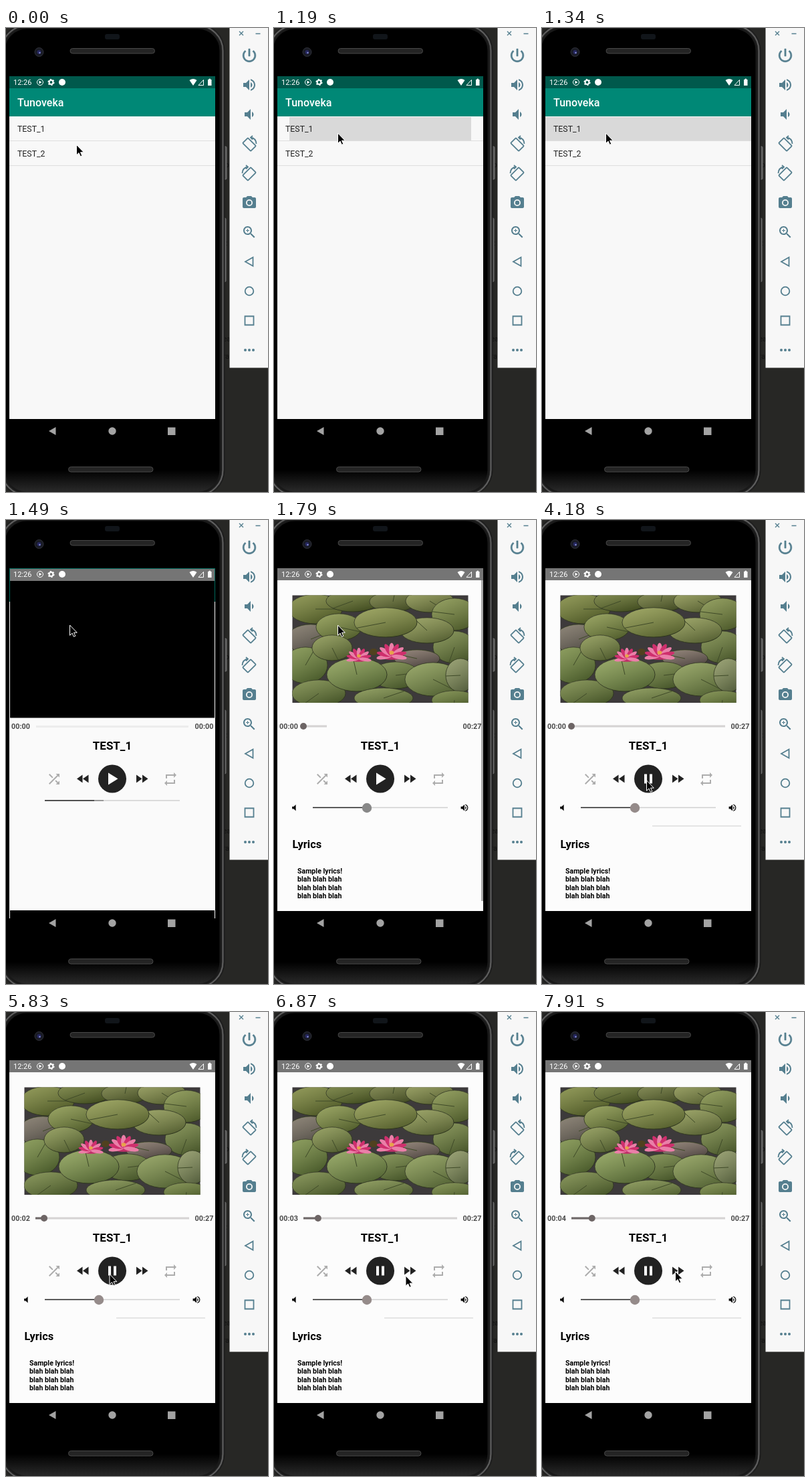
Animation, 392 px wide and 693 px high, one loop 8000 ms. Source, as an HTML page:

```html
<!DOCTYPE html>
<html lang="en">
<head>
<meta charset="utf-8">
<title>Music player demo</title>
<style>
html, body { margin: 0; width: 100%; height: 100%; overflow: hidden; background: #272725; }
svg { display: block; width: 392px; height: 693px; font-family: Roboto, sans-serif; }
.panel { fill: #557f8f; }
.outline { fill: none; stroke: #557f8f; stroke-width: 1.8; }
.bold { font-weight: 700; }
.time { font-size: 10.8px; font-weight: 700; fill: #4a4a4a; }
</style>
</head>
<body>
<svg viewBox="0 0 392 693">
  <defs>
    <linearGradient id="glass" y1="660" y2="693" x2="0" gradientUnits="userSpaceOnUse">
      <stop/><stop offset="1" stop-color="#2a2a2a"/>
    </linearGradient>
    <linearGradient id="shade" x2=".6" y2="1">
      <stop stop-color="#e4e6b0" stop-opacity=".3"/><stop offset="1" stop-color="#1c2410" stop-opacity=".4"/>
    </linearGradient>
    <clipPath id="frame"><path d="M27.5 112.5h263V273h-263z"/></clipPath>
    <path id="speaker" d="M3 9v6h4l5 5V4L7 9H3zm13.5 3c0-1.77-1.02-3.29-2.5-4.03v8.05c1.48-.73 2.5-2.25 2.5-4.02zM14 3.23v2.06c2.89.86 5 3.54 5 6.71s-2.11 5.85-5 6.71v2.06c4.01-.91 7-4.49 7-8.77s-2.99-7.86-7-8.77z"/>
  </defs>

  <!-- Phone -->
  <g font-size="10" fill="#111"><text x="325" y="468">ea</text><text x="325" y="494">ra</text><text x="328" y="208">o</text><text x="329" y="325">:</text></g>
  <g fill="#5c5c5c" stroke="#858585" stroke-width=".8">
    <rect x="325" y="177" width="5" height="49" rx="1.5"/>
    <rect x="324" y="284" width="5" height="95" rx="1.5"/>
  </g>
  <rect x="-9" y="-6" width="336" height="706" rx="40" fill="#2b2b2b" stroke="#181818"/>
  <rect x="-6.500" y="-3.5" width="331" height="701" rx="37.5" fill="none" stroke="#666" stroke-width="1.6"/>
  <rect x="-3" y="0" width="324" height="694" rx="34" fill="url(#glass)" stroke="#191919" stroke-width="3"/>
  <rect x="148" y="9" width="22" height="8" rx="3" fill="#11151a"/>
  <g fill="#242424" stroke="#484848">
    <rect x="96" y="30.5" width="126.5" height="7.5" rx="3.7"/>
    <rect x="93.5" y="655.5" width="126.5" height="7.5" rx="3.7"/>
  </g>
  <circle cx="49.5" cy="36" r="6.5" fill="#191b24" stroke="#30323a"/>
  <circle cx="49.5" cy="36" r="3" fill="#25275e"/>
  <circle cx="50.5" cy="37" r="1.2" fill="#8c92d8"/>

  <!-- Track list -->
  <g id="list">
    <path d="M5 72h308v512H5z" fill="#f8f8f8"/>
    <path d="M5 72h308v18H5z" fill="#00594c"/>
    <path d="M5 90h308v42H5z" fill="#008876"/>
    <rect id="ripple" y="133" height="35" fill="#d9d9d9"/>
    <path d="M5 168.5h308M5 205.5h308" stroke="#dedede"/>
    <text x="17" y="117" font-size="16" font-weight="500" fill="#fff">Tunoveka</text>
    <g font-size="12.3" fill="#222"><text x="17" y="154.5">TEST_1</text><text x="17" y="191.5">TEST_2</text></g>
  </g>

  <!-- Player while it opens -->
  <g id="opening">
    <path d="M5 72h308v50H5z" fill="#00695c"/>
    <path d="M5 122h308v473H5z" fill="#fafafa"/>
    <path d="M6 73h306v18H6z" fill="#757575"/>
    <path d="M6 91h306v204.5H6zM6 583h306v12H6z"/>
    <path d="M45 308.5h228" stroke="#ececec" stroke-width="3"/>
    <path d="M58 419h202" stroke="#d0d0d0" stroke-width="1.5"/>
    <path d="M132 419h14" stroke="#999" stroke-width="2"/>
    <path d="M58 419h74" stroke="#222" stroke-width="1.7"/>
  </g>

  <!-- Player -->
  <g id="player">
    <path d="M5 72h308v512H5z" fill="#fcfcfc"/>
    <path d="M5 72h308v18H5z" fill="#757575"/>
    <g id="photo" clip-path="url(#frame)"><path d="M27 112h264v161H27z" fill="#3d3a3b"/></g>
    <path id="track" stroke="#d5d3d3" stroke-width="3"/>
    <path id="played" stroke="#6d6767" stroke-width="3"/>
    <circle id="thumb" cy="308" r="5" fill="#6d6565"/>
    <path d="M139 429.5h121" stroke="#d0d0d0" stroke-width="1.5"/>
    <path d="M58 429.5h81" stroke="#222" stroke-width="1.7"/>
    <circle id="knob" cx="139" cy="430" r="7.2"/>
    <path transform="translate(23 422.6)scale(.6)" d="M7 9v6h4l5 5V4l-5 5H7z"/>
    <use href="#speaker" transform="translate(277.8 422.6)scale(.6)"/>
    <path id="divider" d="M165 457h133" stroke="#dedede" stroke-width="1.5"/>
    <text class="bold" x="27.5" y="490" font-size="16.5">Lyrics</text>
    <g id="lyrics" class="bold" font-size="10.6"></g>
    <path id="scrollbar" d="M311.5 90v479" stroke="#a9a9a9" stroke-width="3"/>
  </g>

  <!-- Controls -->
  <g id="deck">
    <text id="elapsed" class="time" x="8" y="312"></text>
    <text id="total" class="time" x="282.5" y="312"></text>
    <text class="bold" x="159" y="343" font-size="17" text-anchor="middle">TEST_1</text>
    <g fill="#adadad">
      <path transform="translate(60 375)" d="M10.59 9.17L5.41 4 4 5.41l5.17 5.17 1.42-1.41zM14.5 4l2.04 2.04L4 18.59 5.41 20 17.96 7.46 20 9.5V4h-5.5zm.33 9.41l-1.41 1.41 3.13 3.13L14.5 20H20v-5.5l-2.04 2.04-3.13-3.13z"/>
      <path transform="translate(234 375)" d="M7 7h10v3l4-4-4-4v3H5v6h2V7zm10 10H7v-3l-4 4 4 4v-3h12v-6h-2v4z"/>
    </g>
    <g fill="#222">
      <path transform="translate(103.5 374.5)" d="M11 18V6l-8.5 6 8.5 6zm.5-6l8.5 6V6l-8.5 6z"/>
      <path transform="translate(191 374.5)" d="M4 18l8.5-6L4 6v12zm9-12v12l8.5-6L13 6z"/>
      <circle cx="159" cy="386.5" r="21"/>
    </g>
    <path id="toggle" fill="#fff"/>
  </g>

  <!-- Status bar and navigation -->
  <g fill="#fff">
    <text x="11" y="85" font-size="11">12:26</text>
    <circle cx="51" cy="81" r="4.5" fill="none" stroke="#fff"/>
    <path d="M49.5 78.5v5l4-2.5z"/>
    <circle cx="67.5" cy="81" r="2.9" fill="none" stroke="#fff" stroke-width="2"/>
    <circle cx="67.5" cy="81" r="4.3" fill="none" stroke="#fff" stroke-width="1.6" stroke-dasharray="2.2 2.3"/>
    <circle cx="84" cy="81" r="5"/>
    <path d="M274.5 78q5.5-4 11 0l-5.5 8z"/>
    <path d="M288 85.5h7.5v-8z" fill="none" stroke="#fff"/>
    <path d="M302 77h1.5v-1.2h2.5V77h1.5v9H302z"/>
  </g>
  <g fill="#a3a3a3"><path d="M64 602l10.5-6v12z"/><circle cx="159" cy="602" r="5.7"/><path d="M242 596.5h11.5V608H242z"/></g>

  <!-- Emulator toolbar -->
  <path d="M334.5 0H392v507.5h-57.5z" fill="#f7f7f7"/>
  <path class="outline" style="stroke-width:1.4" d="M349 5l6 6m0-6l-6 6M373.5 8.5h7"/>
  <g class="panel">
    <path transform="translate(350.8 27.8)scale(1.1)" stroke="#557f8f" stroke-width=".5" d="M13 3h-2v10h2V3zm4.83 2.17l-1.42 1.42C17.99 7.86 19 9.81 19 12c0 3.87-3.13 7-7 7s-7-3.13-7-7c0-2.19 1.01-4.14 2.58-5.42L6.17 5.17C4.23 6.82 3 9.26 3 12c0 4.97 4.03 9 9 9s9-4.03 9-9c0-2.74-1.23-5.18-3.17-6.83z"/>
    <use href="#speaker" x="352" y="73"/>
    <path transform="translate(352 117)" d="M18.5 12c0-1.77-1.02-3.29-2.5-4.03v8.05c1.48-.73 2.5-2.25 2.5-4.02zM5 9v6h4l5 5V4L9 9H5z"/>
    <path transform="translate(352 249)" fill-rule="evenodd" d="M9 2L7.17 4H4c-1.1 0-2 .9-2 2v12c0 1.1.9 2 2 2h16c1.1 0 2-.9 2-2V6c0-1.1-.9-2-2-2h-3.17L15 2H9zm3 15a5 5 0 1 1 0-10 5 5 0 0 1 0 10zm0-1.8a3.2 3.2 0 1 0 0-6.4 3.2 3.2 0 0 0 0 6.4z"/>
    <path transform="translate(352 293)" d="M15.5 14h-.79l-.28-.27C15.41 12.59 16 11.11 16 9.5 16 5.91 13.09 3 9.5 3S3 5.91 3 9.5 5.91 16 9.5 16c1.61 0 3.09-.59 4.23-1.57l.27.28v.79l5 4.99L20.49 19l-4.99-5zm-6 0C7.01 14 5 11.99 5 9.5S7.01 5 9.5 5 14 7.01 14 9.5 11.99 14 9.5 14zm2.5-4h-2v2H9v-2H7V9h2V7h1v2h2v1z"/>
    <circle cx="358" cy="481" r="2"/><circle cx="364" cy="481" r="2"/><circle cx="370" cy="481" r="2"/>
  </g>
  <g class="outline">
    <g id="rotate"><rect x="-8.5" y="-5.5" width="17" height="11" rx="1" transform="translate(364 174)rotate(45)"/><path d="M366 163.5q8 1 8.5 9.5M369 161l-3 2.5 3 3"/></g>
    <use href="#rotate" transform="translate(728 44)scale(-1 1)"/>
    <path d="M358 349l11.5-6.5v13z"/><circle cx="364" cy="393" r="6.3"/><path d="M357.5 430.5h13v13h-13z"/>
  </g>

  <path id="cursor" d="M0 0V15.3L3.5 12 5.9 17.3 8.3 16.2 6 11.2H10.8Z" stroke="#fff"/>
</svg>

<script>
const LOOP = 8000;
const REFRESH = [0, 300, 450, 600, 740, 1190, 1340, 1490, 1640, 1790, 2090, 2240, 2390, 2540,
  2690, 2840, 2990, 3140, 3290, 4180, 4330, 4630, 4780, 4930, 5080, 5380, 5530, 5830, 5970,
  6120, 6270, 6420, 6570, 6720, 6870, 7020, 7170, 7310, 7610, 7760, 7910];
// Cursor keys: time, x, y.
const CURSOR = [[0, 105.5, 174.5], [150, 105.5, 174.5], [740, 95.5, 157], [1940, 95.5, 157], [3290, 156.5, 389],
  [4180, 156.5, 389], [4780, 155, 391.5], [5830, 155, 391.5], [6870, 197, 394], [7310, 199.5, 387.5], [LOOP, 199.5, 387.5]];
const PLAY = 'M153 377.5v18l14.5-9z';
const PAUSE = 'M153 379.5h4v14h-4zM161 379.5h4v14h-4z';

const $ = id => document.getElementById(id);
const set = (id, attrs) => { for (const k in attrs) $(id).setAttribute(k, attrs[k]); };
const show = (id, on) => set(id, { visibility: on ? 'visible' : 'hidden' });

function drawPhoto() {
  // Lily pads: centre, radii, colour.
  const pads = [
    [62, 133, 40, 22, '#727d38'], [118, 121, 40, 16, '#616e30'], [178, 122, 35, 15, '#626b36'],
    [233, 121, 36, 17, '#848d4e'], [270, 141, 34, 24, '#748442'], [55, 178, 36, 22, '#6d6064'],
    [270, 190, 32, 24, '#67793e'], [229, 165, 40, 19, '#848f50'], [97, 160, 34, 20, '#7c8b45'],
    [167, 153, 47, 22, '#848f48'], [47, 217, 33, 27, '#6e8542'], [87, 191, 30, 19, '#7a8849'],
    [214, 207, 34, 13, '#745f66'], [182, 232, 36, 20, '#667a3e'], [67, 259, 40, 20, '#64773b'],
    [124, 231, 45, 25, '#7d9550'], [238, 238, 42, 25, '#7c9050'], [279, 232, 22, 25, '#7f8a60'],
    [164, 266, 44, 15, '#708345'], [270, 269, 34, 14, '#627637']];
  const pad = ([x, y, rx, ry, fill], i) => {
    const shape = `<ellipse cx="${x}" cy="${y}" rx="${rx}" ry="${ry}"`;
    return `${shape} fill="${fill}" stroke="#2f361f"/>${shape} fill="url(#shade)"/>` +
      `<path d="M${x} ${y}l${rx * Math.cos(i * 2.4)} ${ry * Math.sin(i * 2.4)}" stroke="#3f4a28"/>`;
  };
  const flower = (x, y, size) => {
    let petals = '';
    for (let a = -100; a <= 100; a += 25)
      petals += `<ellipse cy="-10" rx="3.4" ry="10" transform="rotate(${a})" fill="${a % 50 ? '#cf2f6d' : '#ea7fa8'}"/>`;
    return `<g transform="translate(${x} ${y})scale(${size} ${size * .85})">` +
      `<ellipse rx="15" ry="6" fill="#c12f69"/>${petals}<circle cy="-5" r="3" fill="#e7a34a"/></g>`;
  };
  $('photo').innerHTML += pads.map(pad).join('') +
    '<ellipse cx="149" cy="197" rx="6" ry="5" fill="#50411f"/>' +
    flower(127, 207, .95) + flower(176, 203, 1.15);
}

function cursorAt(t) {
  const i = CURSOR.findIndex(key => key[0] > t);
  const [t0, x0, y0] = CURSOR[i - 1], [t1, x1, y1] = CURSOR[i];
  const p = (t - t0) / (t1 - t0);
  return [x0 + (x1 - x0) * p, y0 + (y1 - y0) * p];
}

function render(time) {
  const t = REFRESH.findLast(step => step <= time);
  show('list', t < 1490);
  show('opening', t === 1490);
  show('player', t >= 1640);
  show('deck', t >= 1490);

  const [left, width] = t === 1190 ? [23, 272] : t === 1340 ? [5, 308] : [5, 0];
  set('ripple', { x: left, width });

  const seconds = Math.max(0, t - 4300) / 1000;
  const x = 44 + seconds * 230 / 27;
  $('elapsed').textContent = '00:0' + Math.round(seconds);
  $('total').textContent = t < 1640 ? '00:00' : '00:27';
  set('track', { d: `M44 308H${t < 2090 ? 79 : 274}` });
  set('played', { d: `M44 308H${x}` });
  set('thumb', { cx: x });
  set('knob', { fill: t < 2090 ? '#888' : '#958b8a' });
  set('toggle', { d: t < 4180 ? PLAY : PAUSE });
  set('scrollbar', { opacity: Math.min(1, Math.max(0, (3290 - t) / 300)) });
  set('divider', { opacity: t < 3140 ? 0 : 1 });
  set('cursor', { transform: `translate(${cursorAt(t)})` });
}

drawPhoto();
$('lyrics').innerHTML = ['Sample lyrics!', 'blah blah blah', 'blah blah blah', 'blah blah blah']
  .map((line, i) => `<text x="35" y="${528 + i * 12.3}">${line}</text>`).join('');

const start = performance.now();
(function tick() {
  render((performance.now() - start) % LOOP);
  requestAnimationFrame(tick);
})();
</script>
</body>
</html>
```
